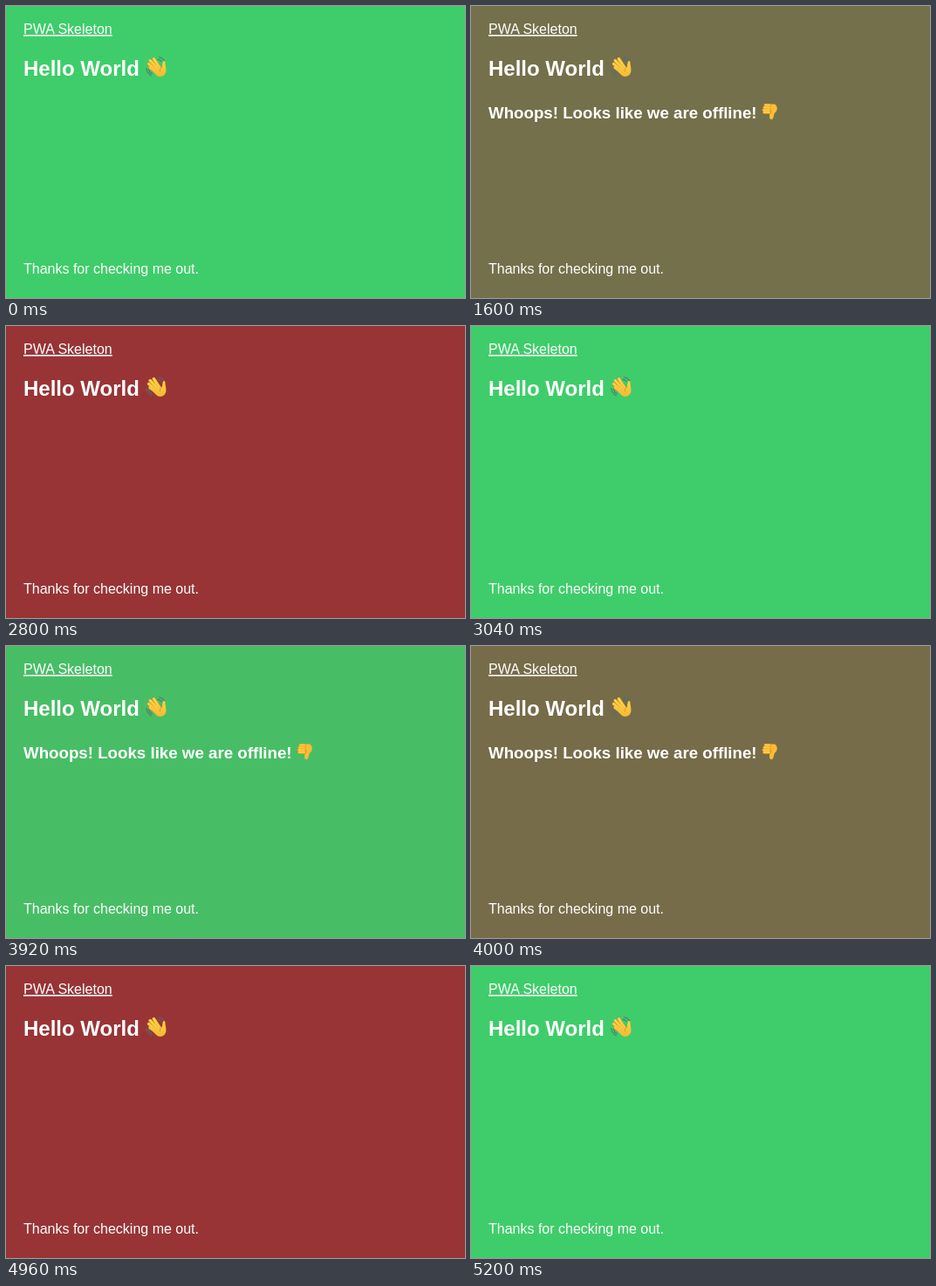
These frames come from a looping animation (526x335 px, 5760 ms). An HTML page:

```html
<!DOCTYPE html>
<html lang="en">
<meta charset="utf-8">
<title>PWA Skeleton</title>
<style>
  html, body { margin: 0; width: 100%; height: 100%; overflow: hidden; background: #3ecd6a; }
  svg { display: block; font: 16px "Liberation Sans", Arial, sans-serif; fill: #fff; }
  .link { text-decoration: underline; }
  .title { font-size: 24px; font-weight: bold; }
  .alert { font-size: 18.72px; font-weight: bold; }
  .line { fill: none; stroke-linecap: round; stroke-linejoin: round; }
</style>
<svg width="526" height="335" viewBox="0 0 526 335">
  <defs>
    <linearGradient id="skin" gradientUnits="userSpaceOnUse" x1="0" y1="57" x2="0" y2="83">
      <stop stop-color="#ffdc50"/><stop offset="1" stop-color="#f5b52e"/>
    </linearGradient>
  </defs>
  <text class="link" x="20" y="32">PWA Skeleton</text>
  <text class="title" x="20" y="80">Hello World</text>

  <!-- waving hand -->
  <g class="line">
    <path d="M175.5 58.8q4 .7 6 4M173.8 61.3q3 .2 4.4 2.4M160.8 71.5q.8 5.5 5.7 8.6M163.2 71.8q.8 3.8 4 6" stroke="#4c7077" stroke-width="1.1" opacity=".85"/>
    <path d="M177 72L169.3 60.6M175 73L165.2 62.6M173.5 75L163.5 66.4M173 76.5L165 70.7" stroke="#d98b20" stroke-width="3.7"/>
    <path d="M177 72L169.3 60.6M175 73L165.2 62.6M173.5 75L163.5 66.4M173 76.5L165 70.7" stroke="url(#skin)" stroke-width="2.9"/>
    <path d="M172 70L178.8 70.3Q179.2 66 180 63.8Q181 62 182.2 63.8Q182.6 67.5 183.4 72Q184 78 179.6 80.3Q175.2 82.2 171.7 78.7L168.6 75.2Z" fill="url(#skin)"/>
    <path d="M178.7 70Q175.8 71.5 176.5 75" stroke="#d98b20" stroke-width=".8"/>
  </g>

  <g id="alert" visibility="hidden">
    <text class="alert" x="20" y="129">Whoops! Looks like we are offline!</text>
    <!-- thumb down -->
    <g class="line">
      <path d="M337 112.8L348 112.5Q350.8 114 350.8 118Q350.6 121.5 347.8 123L346.3 128.5Q345.2 131 343 129.8Q341.7 128.8 342.3 123.5L336 122.5Z" fill="#fdbb35"/>
      <path d="M337.2 113.7H342M336 116.5H342M335.2 119.3H342M335.8 122H342" stroke="#d98920" stroke-width="3.3"/>
      <path d="M337.2 113.7H342M336 116.5H342M335.2 119.3H342M335.8 122H342" stroke="#ffcc42" stroke-width="2.3"/>
      <path d="M342.6 123.8Q344.5 122 343.8 119.5" stroke="#d98920" stroke-width=".8"/>
    </g>
  </g>
  <text x="20" y="307">Thanks for checking me out.</text>
</svg>
<script>
  const LOOP = 5760, STEP = 80, FADE = 300;
  const online = [62, 205, 106], offline = [152, 52, 54];
  // fade start, first changed picture, settled picture, offline?
  const switches = [
    [1495, 1600, 1760, true],
    [2800, 2800, 3040, false],
    [3890, 3920, 4160, true],
    [4960, 4960, 5200, false]
  ];
  const alertBox = document.getElementById("alert");

  // CSS "ease": cubic-bezier(.25, .1, .25, 1)
  function ease(x) {
    const curve = (a, b, u) => 3 * a * u * (1 - u) ** 2 + 3 * b * u * u * (1 - u) + u ** 3;
    let lo = 0, hi = 1;
    for (let i = 0; i < 20; i++) {
      const mid = (lo + hi) / 2;
      if (curve(.25, .25, mid) < x) lo = mid; else hi = mid;
    }
    return curve(.1, 1, lo);
  }

  function draw(now) {
    const t = Math.floor(now % LOOP / STEP) * STEP;
    let red = 0, down = false;
    for (const [start, shown, settled, toOffline] of switches) {
      if (t < shown) break;
      const k = t >= settled ? 1 : ease((t - start) / FADE);
      red = toOffline ? k : 1 - k;
      down = toOffline;
    }
    const rgb = online.map((c, i) => Math.round(c + (offline[i] - c) * red));
    document.body.style.background = `rgb(${rgb})`;
    alertBox.setAttribute("visibility", down ? "visible" : "hidden");
  }

  const begin = performance.now();
  function tick() {
    draw(performance.now() - begin);
    requestAnimationFrame(tick);
  }
  tick();
</script>
</html>
```
